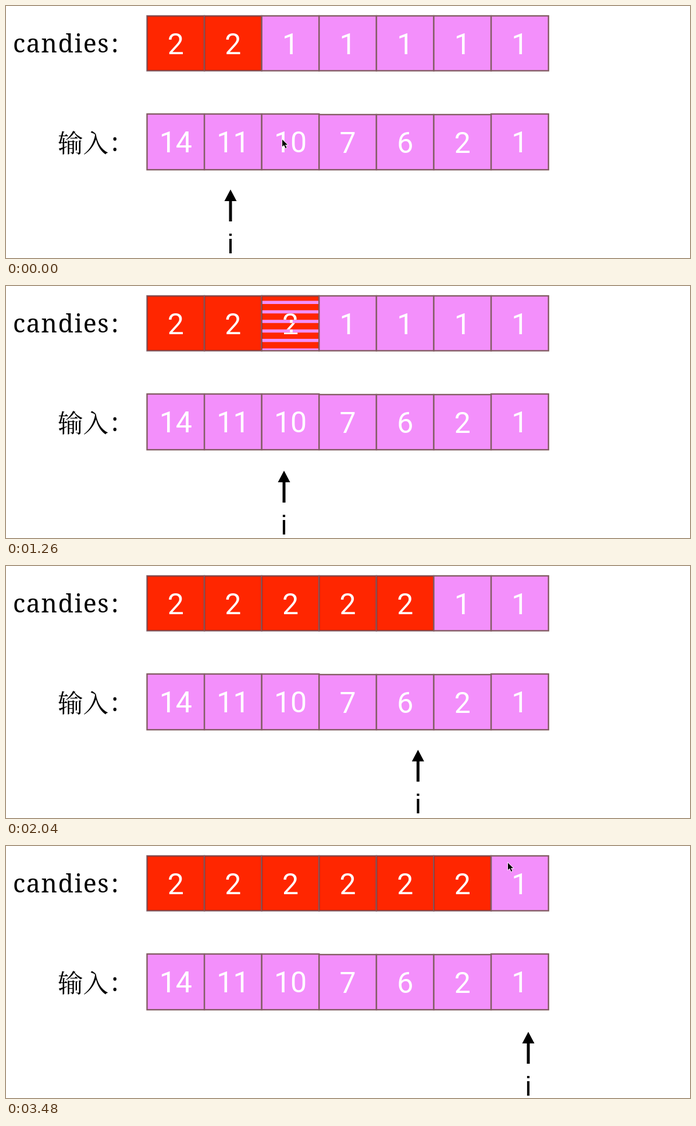
Write an HTML page with a canvas that moves like this. It is 1176 px wide and 434 px high and loops after 3540 ms.

```html
<!DOCTYPE html>
<html lang="zh">
<head>
<meta charset="utf-8">
<style>
html, body { margin: 0; width: 100%; height: 100%; overflow: hidden; background: #fff; }
canvas { display: block; }
</style>
</head>
<body>
<canvas id="stage" width="1176" height="434"></canvas>
<script>
const ctx = document.getElementById('stage').getContext('2d');
const LOOP = 3540, STEP = 60;
const PINK = '#f38ffb', RED = '#ff2600', LINE = '#835d64', DARK = '#a52a1c';
const LEFT = 242.5, PITCH = 98.6, TOP = 17, HEIGHT = 94.5;
const input = [14, 11, 10, 7, 6, 2, 1];

// Start of each cell's blinds transition; the last cell never changes.
const flips = [-999, -999, 1140, 1450, 1700, 2180, Infinity];
const flipTime = i => i === 3 ? 110 : 180;

// [start, end, x, y]: eased moves to successive places.
const pointer = [[0, 0, 386, 316], [740, 950, 478, 318], [1330, 1435, 587, 317],
  [1565, 1680, 685, 316], [1990, 2160, 797, 318], [2560, 2740, 898, 320]];
const mouse = [[0, 0, 475, 230], [60, 600, 594, 386], [3060, 3360, 863, 29]];

function place(moves, t) {
  let [, , x, y] = moves[0];
  for (const [start, end, nx, ny] of moves.slice(1)) {
    const u = Math.min(1, Math.max(0, (t - start) / (end - start)));
    const e = u * u * (3 - 2 * u);
    x += (nx - x) * e;
    y += (ny - y) * e;
  }
  return [x, y];
}

function text(str, x, y, font, color = '#000', align = 'left', spacing = 0) {
  ctx.font = font;
  ctx.fillStyle = color;
  ctx.textAlign = align;
  ctx.letterSpacing = spacing + 'px';
  ctx.fillText(str, x, y);
}

function polygon(points) {
  ctx.beginPath();
  points.forEach(([x, y]) => ctx.lineTo(x, y));
  ctx.closePath();
}

function cell(i, y, h, value, red) {
  const x = LEFT + i * PITCH;
  ctx.fillStyle = red ? RED : PINK;
  ctx.fillRect(x, y, PITCH, h);
  ctx.lineWidth = 2.4;
  ctx.strokeStyle = LINE;
  ctx.strokeRect(x, y, PITCH, h);
  if (red) {
    ctx.lineWidth = 1;
    ctx.strokeStyle = DARK;
    ctx.strokeRect(x + 1, y + 1, PITCH - 2, h - 2);
  }
  text(value, x + PITCH / 2, y + 65.5, '50px Roboto, "Liberation Sans", sans-serif', '#fff', 'center');
}

function candy(i, t) {
  const p = Math.min(1, Math.max(0, (t - flips[i]) / flipTime(i)));
  cell(i, TOP, HEIGHT, p === 1 ? 2 : 1, p === 1);
  if (p === 0 || p === 1) return;
  ctx.save();
  ctx.beginPath();
  const slat = (HEIGHT + 4) / 6;
  for (let k = 0; k < 6; k++)
    ctx.rect(LEFT + i * PITCH - 1, TOP - 2.5 + k * slat, PITCH + 2, slat * p);
  ctx.clip();
  cell(i, TOP, HEIGHT, 2, true);
  ctx.restore();
}

function drawPointer(t) {
  const [x, y] = place(pointer, t);
  ctx.fillStyle = '#000';
  polygon([[x, y], [x + 10.5, y + 20], [x - 10.5, y + 20]]);
  ctx.fill();
  ctx.fillRect(x - 2.5, y + 18, 5, 37);
  text('i', x, y + 110, '47px "Liberation Sans", Arial, sans-serif', '#000', 'center');
}

function drawMouse(t) {
  if (t >= 1080 && t < 3060) return;
  const [x, y] = place(mouse, t);
  polygon([[0, 0], [0, 12], [3, 9.5], [5.5, 15], [7.5, 14], [5, 9], [9, 9]]
    .map(([dx, dy]) => [x + dx, y + dy]));
  ctx.lineWidth = 1.5;
  ctx.strokeStyle = '#fff';
  ctx.stroke();
  ctx.fillStyle = '#000';
  ctx.fill();
}

function draw(t) {
  ctx.fillStyle = '#fff';
  ctx.fillRect(0, 0, 1176, 434);
  const serif = '43px "Noto Serif", serif';
  text('candies', 12, 80, serif, '#000', 'left', 1.5);
  text(':', 181, 80, serif);
  text('输入', 89, 252, '500 43.5px "Noto Serif CJK SC", "Noto Sans CJK SC", "Noto Sans CJK", sans-serif');
  text(':', 181, 250, serif);
  input.forEach((n, i) => {
    candy(i, t);
    const y = i > 2 && i < 6 ? 187 : 186;
    cell(i, y, 282 - y, n, false);
  });
  drawPointer(t);
  drawMouse(t);
}

const begin = performance.now();
function tick() {
  const t = (performance.now() - begin) % LOOP;
  draw(Math.floor(t / STEP) * STEP);
  requestAnimationFrame(tick);
}
tick();
</script>
</body>
</html>
```
